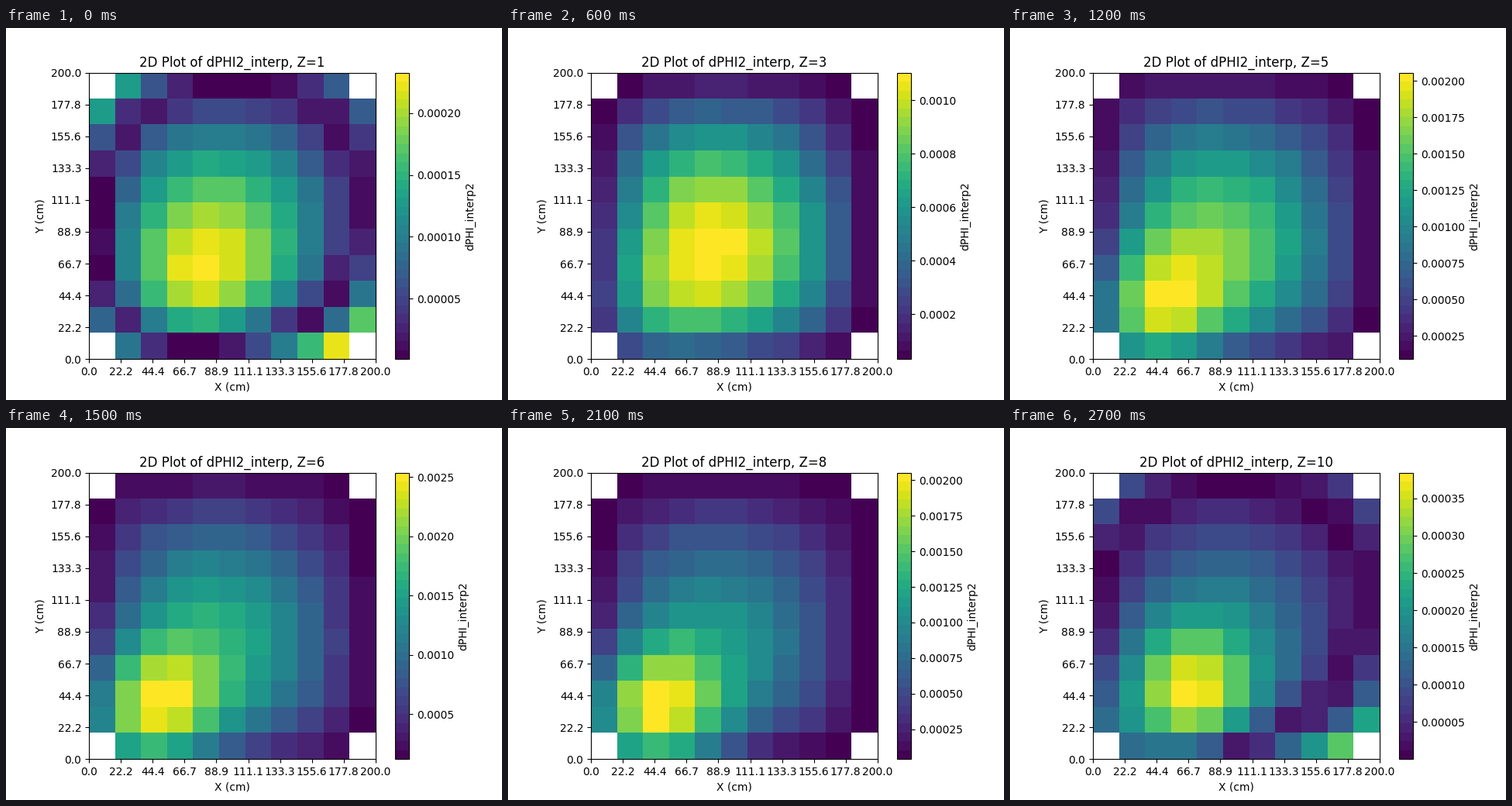
A matplotlib script for the animation above (3000 ms loop, 640 px wide and 480 px high).

```python
import numpy as np
import matplotlib.pyplot as plt
from matplotlib.animation import FuncAnimation

SIZE = 11
x, y = np.meshgrid(np.arange(SIZE), np.arange(SIZE))

# Colour limits at a few levels; the levels between are linear.
KEY_Z = [1, 2, 4, 6, 7, 9, 10]
LOW = [1.2e-6, 3e-6, 6e-5, 1.2e-4, 7.3e-5, 7e-6, 4e-7]
HIGH = [2.326e-4, 6.32e-4, 1.575e-3, 2.536e-3, 2.983e-3, 1.124e-3, 3.846e-4]


def arch(u, margin, peak):
    """Half sine across the grid, warped so that it is highest at peak."""
    span = SIZE - 1 + 2 * margin
    warp = np.log(0.5) / np.log((peak + margin) / span)
    return np.sin(np.pi * ((u + margin) / span) ** warp)


def corner(cx, cy, reach_x=1.7, reach_y=1.7):
    """Exponential decay inwards from one corner."""
    dx, dy = abs(x - cx), abs(y - cy)
    return np.exp(-dx / reach_x - dy / reach_y - dx * dy / 8)


def field(z):
    """Magnitude of a broad mode, a drifting lump and corner sinks, 0 to 1."""
    start = np.exp(-1.6 * (z - 1))
    finish = np.exp(-1.4 * (10 - z))
    ends = start + 0.8 * finish

    ramp = np.clip((z - 1) / 6.5, 0, 1)
    ramp = ramp * ramp * (3 - 2 * ramp)
    lump_size = max(0.72 * ramp, 0.25 * start)
    lump_x, lump_y = 1.8 + 1.7 * ends, 1.2 + 0.75 * ends
    lump = np.exp(-((x - lump_x) ** 2 + (y - lump_y) ** 2) / 6.4)

    value = (1.1 - 0.82 * lump_size) * arch(x, 0.25, 4.3) * arch(y, 0.5, 3.9)
    value += lump_size * lump
    value -= (1.4 * start + 1.13 * finish) * corner(10, 0, 4, 1.8)
    value -= (1.1 * start + 0.5 * finish) * corner(0, 10)
    value -= (0.6 * start + 0.4 * finish) * corner(10, 10)
    value -= (0.8 * start - 0.4 * finish) * corner(0, 0)

    value[np.ix_([0, -1], [0, -1])] = np.nan
    level = np.abs(value)
    return level / np.nanmax(level)


fig, ax = plt.subplots(figsize=(6.4, 4.8), dpi=100)
image = ax.imshow(field(1), origin="lower", extent=(0, 200, 0, 200),
                  cmap=plt.get_cmap("viridis", 32), interpolation="nearest")
fig.colorbar(image, ax=ax, label="dPHI_interp2")
ticks = np.linspace(0, 200, 10)
labels = [f"{t:.1f}" for t in ticks]
ax.set_xticks(ticks, labels)
ax.set_yticks(ticks, labels)
ax.set_xlabel("X (cm)")
ax.set_ylabel("Y (cm)")
title = ax.set_title("")


def update(frame):
    z = frame + 1
    low, high = np.interp(z, KEY_Z, LOW), np.interp(z, KEY_Z, HIGH)
    image.set_data(low + field(z) * (high - low))
    image.set_clim(low, high)
    title.set_text(f"2D Plot of dPHI2_interp, Z={z}")
    return image, title


anim = FuncAnimation(fig, update, frames=10, interval=300, repeat=True,
                     repeat_delay=0, blit=False)
plt.show()
```
